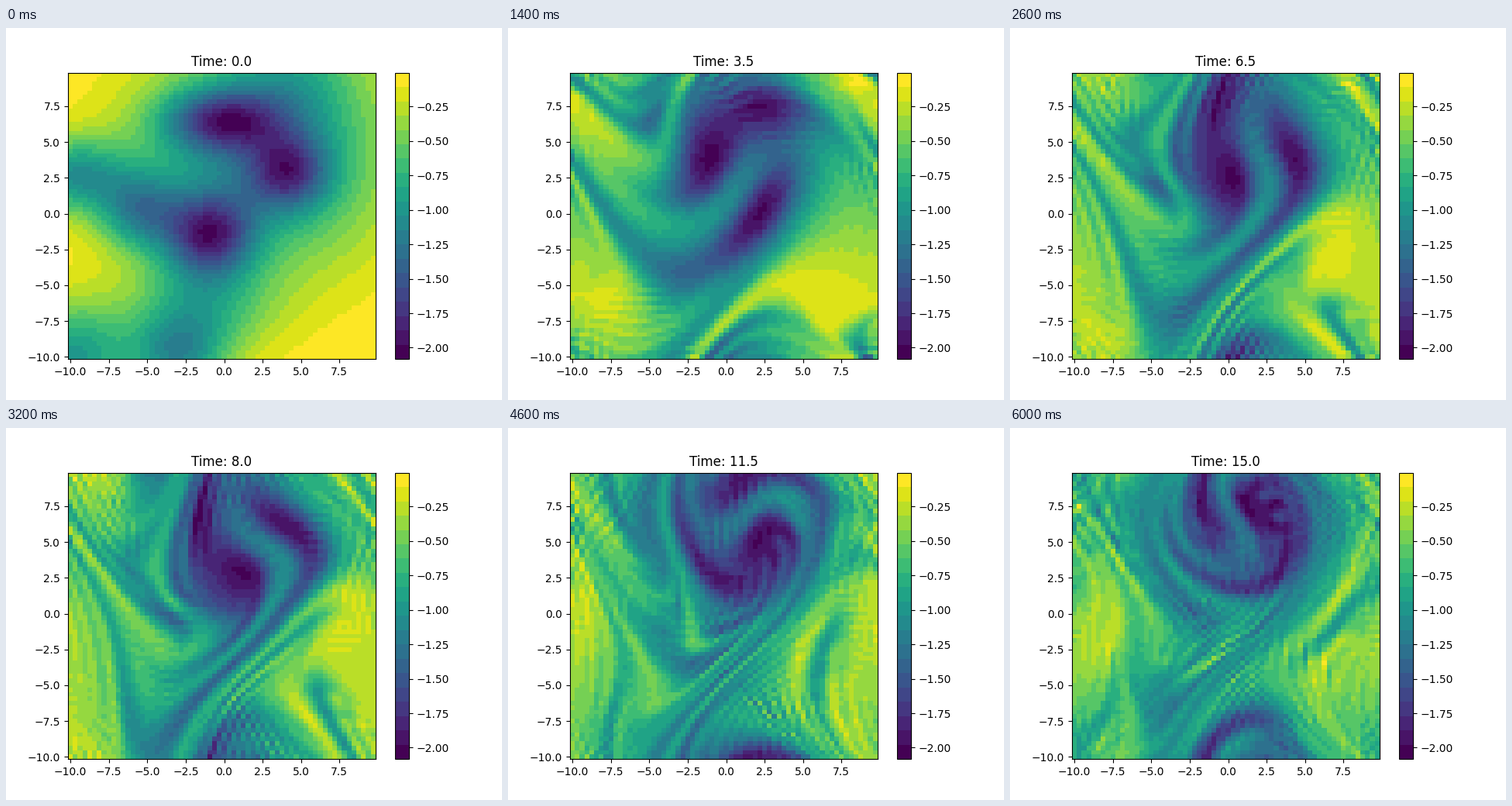
These frames come from a looping animation (640 px wide and 480 px high, 6.2 s). A matplotlib script:

```python
import numpy as np
import matplotlib.pyplot as plt
from matplotlib.animation import FuncAnimation

N, L, NU = 64, 20.0, 0.001
FRAMES, STEP, SUB = 31, 0.5, 12
LOW, HIGH = -2.083, -0.003
H = L / N
x = -L / 2 + H * np.arange(N)
X, Y = np.meshgrid(x, x)

k = 2 * np.pi * np.fft.fftfreq(N, H)
K2 = k[None, :]**2 + k[:, None]**2
K2[0, 0] = 1


def vortex(cx, cy, depth, rx, ry=None):
    """Gaussian dip, round unless a second radius is given."""
    ry = ry or rx
    return -depth * np.exp(-((X - cx) / rx)**2 - ((Y - cy) / ry)**2)


def initial_field():
    broad = vortex(2.5, 4, 1, 8) + vortex(4.5, 9.5, .35, 4)
    cores = (vortex(-.2, 6.5, 1.15, 3.8, 2.2) + vortex(4.2, 2.9, 1, 2.6)
             + vortex(-1, -1.5, 1.4, 2.9))
    west = vortex(-5.5, .2, .9, 2.7) + vortex(-9.8, 2.7, .95, 3.5, 2.6)
    south = (vortex(-1.5, -6.5, .6, 4.5, 3.5) + vortex(-9.8, -10, .95, 3.8)
             + vortex(-3, -10, .9, 3))
    return broad + cores + west + south


def ddx(f):
    return (np.roll(f, -1, 1) - np.roll(f, 1, 1)) / (2 * H)


def ddy(f):
    return (np.roll(f, -1, 0) - np.roll(f, 1, 0)) / (2 * H)


def laplacian(f):
    around = sum(np.roll(f, s, a) for s in (1, -1) for a in (0, 1))
    return (around - 4 * f) / H**2


def rate(w):
    """Vorticity equation on a periodic square; dips turn anticlockwise."""
    psi = np.real(np.fft.ifft2(np.fft.fft2(w) / K2))
    u, v = -ddy(psi), ddx(psi)
    advect = u * ddx(w) + v * ddy(w) + ddx(u * w) + ddy(v * w)
    return NU * laplacian(w) - advect / 2


def advance(w, dt):
    a = rate(w)
    b = rate(w + dt / 2 * a)
    c = rate(w + dt / 2 * b)
    d = rate(w + dt * c)
    return w + dt / 6 * (a + 2 * b + 2 * c + d)


def solve():
    states = [initial_field()]
    while len(states) < FRAMES:
        w = states[-1]
        for _ in range(SUB):
            w = advance(w, STEP / SUB)
        states.append(w)
    return states


states = solve()

fig, ax = plt.subplots(figsize=(6.4, 4.8), dpi=100)
mesh = ax.pcolormesh(X, Y, states[0], shading="auto", vmin=LOW, vmax=HIGH,
                     cmap=plt.get_cmap("viridis", 20))
fig.colorbar(mesh, ax=ax)
title = ax.set_title("Time: 0.0")


def update(i):
    t = i * STEP
    # The colour range widens slowly while the colour bar stays fixed
    span = (LOW - 0.01 * t, HIGH + 0.02 * t)
    mesh.set_array(np.interp(states[i], span, (LOW, HIGH)))
    title.set_text(f"Time: {t:.1f}")
    return mesh, title


anim = FuncAnimation(fig, update, frames=FRAMES, interval=200,
                     repeat=True, repeat_delay=0, blit=False)
plt.show()
```
